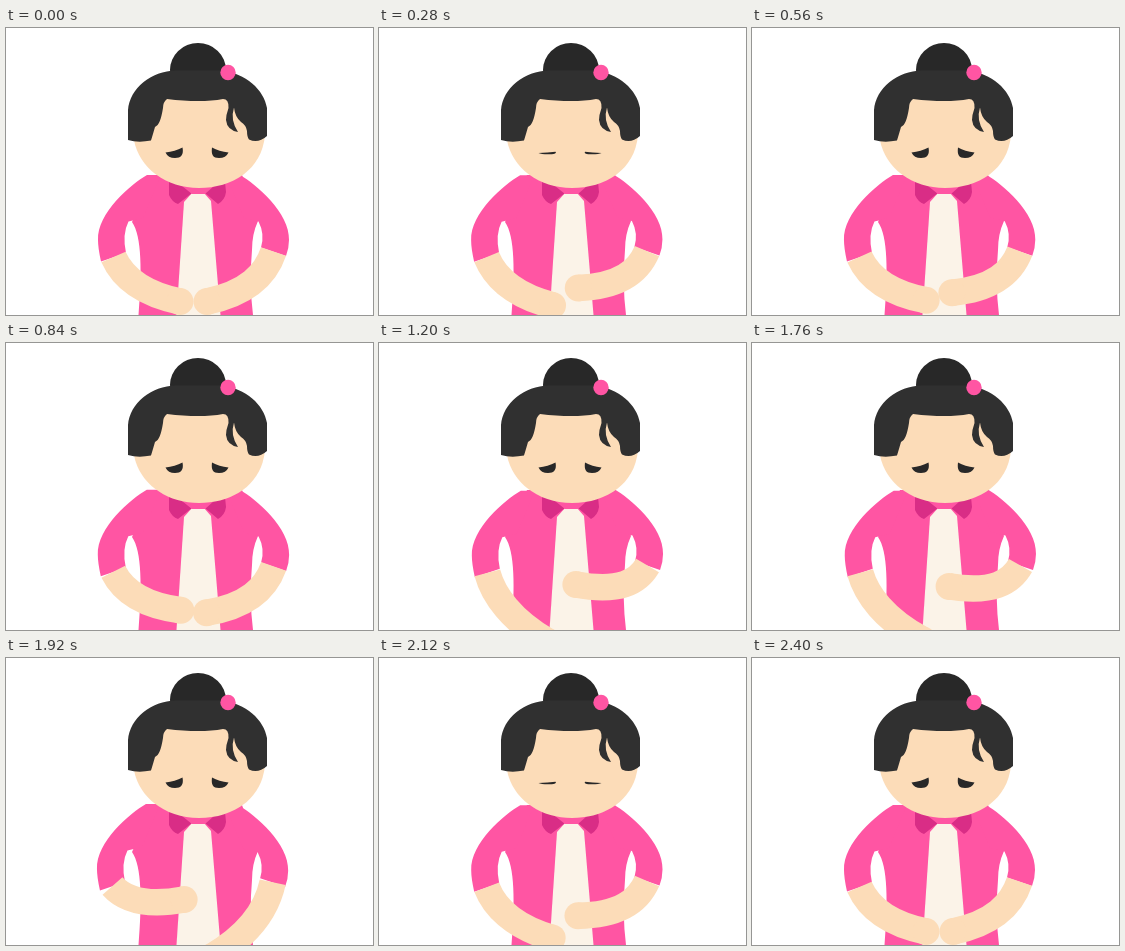
An HTML page that plays this animation: 367 by 287 pixels, repeating every 2480 ms.

```html
<!DOCTYPE html>
<html lang="en">
<head>
<meta charset="utf-8">
<style>
  html, body { margin: 0; width: 100%; height: 100%; overflow: hidden; background: #fff; }
  svg { display: block; width: 100vw; height: 100vh; }
  .pink { fill: #ff55a3; }
  .skin { fill: #fcdcb8; }
  .collar { fill: #d92d86; }
  .hair { fill: #303030; }
  .bun { fill: #282828; }
  .forearm { fill: none; stroke: #fcdcb8; stroke-width: 26.5; }
</style>
</head>
<body>
<svg viewBox="0 0 367 287">
  <path class="pink" d="M148 147H236L252 193Q246 206 246 222Q243 255 247 287H132.500C136 245 136 208 126 194Z"/>
  <path fill="#fbf3e8" d="M178 174L186 165H198L205 173L214.500 287H170.500Z"/>
  <path class="collar" d="M163 154V167Q166 174 172 176L186 165L178 156ZM219 154L220 164Q219 172 212 176L199 165L206 156Z"/>
  <path class="pink" d="M176 158H208L199 166H186Z"/>

  <g transform="matrix(-1 0 0 1 375 0)"><g class="arm"></g></g>
  <g class="arm"></g>

  <path class="skin" d="M128 112C133 140 160 160 193 160C226 160 256 142 259 107L240 60H145Z"/>
  <ellipse class="bun" cx="192" cy="42" rx="28" ry="27"/>
  <path class="hair" d="M122 112V82C124 60 145 43 170 42.500H215C240 45 258 62 261 80V108Q252 116 243 111.500Q241 109 241 103Q240 97 235 94Q229 89 228 79.500Q224 92 232 104Q221 102 220 92Q220 87 222.500 80Q223 71 217 71Q195 75 161 71Q157 74 157 80C155 92 153 97 149 99Q147 106 145 112.500Q132 115 122 112Z"/>
  <circle class="pink" cx="222" cy="44.500" r="7.700"/>

  <g id="eyes" class="bun">
    <path d="M159.500 124.500Q169 123.500 176.500 119.500C178 127 175 130 169 130Q162 130 159.500 124.500Z"/>
    <path d="M206 119.500Q213 123.500 222.500 124.500Q220 130 213 130C207 130 205 127 206 119.500Z"/>
  </g>
</svg>
<script>
const LOOP = 2480, MOVE = 2400, STEP = 40, SWING = 288;
const eyes = document.getElementById('eyes');

// drop: how much lower the cuff sits
function makeArm(group, drop) {
  group.innerHTML = `<path class="pink" d="M220 147H234C250 156 284 185 283 212Q283 220 280 ${228 + drop}
    L255 ${219.5 + drop}Q259 206 252.500 193.500L238 190Z"/>
    <path class="forearm"/><circle class="skin" r="13.500"/>`;
  const [, forearm, hand] = group.children;
  return { group, forearm, hand, cuff: 223.5 + drop };
}
const [leftArm, rightArm] = [...document.querySelectorAll('.arm')]
  .map((group, i) => makeArm(group, i ? 0 : 5.5));

// lift: 0 is the rest pose, 1 is the hand fully raised
function poseArm({ group, forearm, hand, cuff }, lift) {
  const at = (x, y, dx, dy) => `${x + dx * lift} ${y + dy * lift}`;
  group.setAttribute('transform', `translate(${lift} ${-lift})`);
  forearm.setAttribute('d',
    `M267.500 ${cuff}C${at(260, 246, -2, -6)} ${at(242, 265, -2, -14)} ${at(201, 273.5, -5, -30)}`);
  hand.setAttribute('cx', 201 - 5 * lift);
  hand.setAttribute('cy', 273.5 - 30 * lift);
}

const blink = (t, middle) => Math.max(0, 1 - Math.max(0, Math.abs(t - middle) - 20) / 100);

function draw(now) {
  const t = Math.min(MOVE, Math.floor(now % LOOP / STEP) * STEP);
  const fade = Math.min(1, t / 100, (MOVE - t) / 100);
  const swing = Math.sin(2 * Math.PI * (t - 842) / SWING);
  const raise = 5 - 2 * swing * swing;
  poseArm(leftArm, fade * (raise - 29 * swing) / 31);
  poseArm(rightArm, fade * (raise + 29 * swing) / 31);

  const open = 1 - 0.76 * Math.max(blink(t, 280), blink(t, 2120));
  eyes.setAttribute('transform', `matrix(1 0 0 ${open} 0 ${125 * (1 - open)})`);
  requestAnimationFrame(draw);
}
requestAnimationFrame(draw);
</script>
</body>
</html>
```
